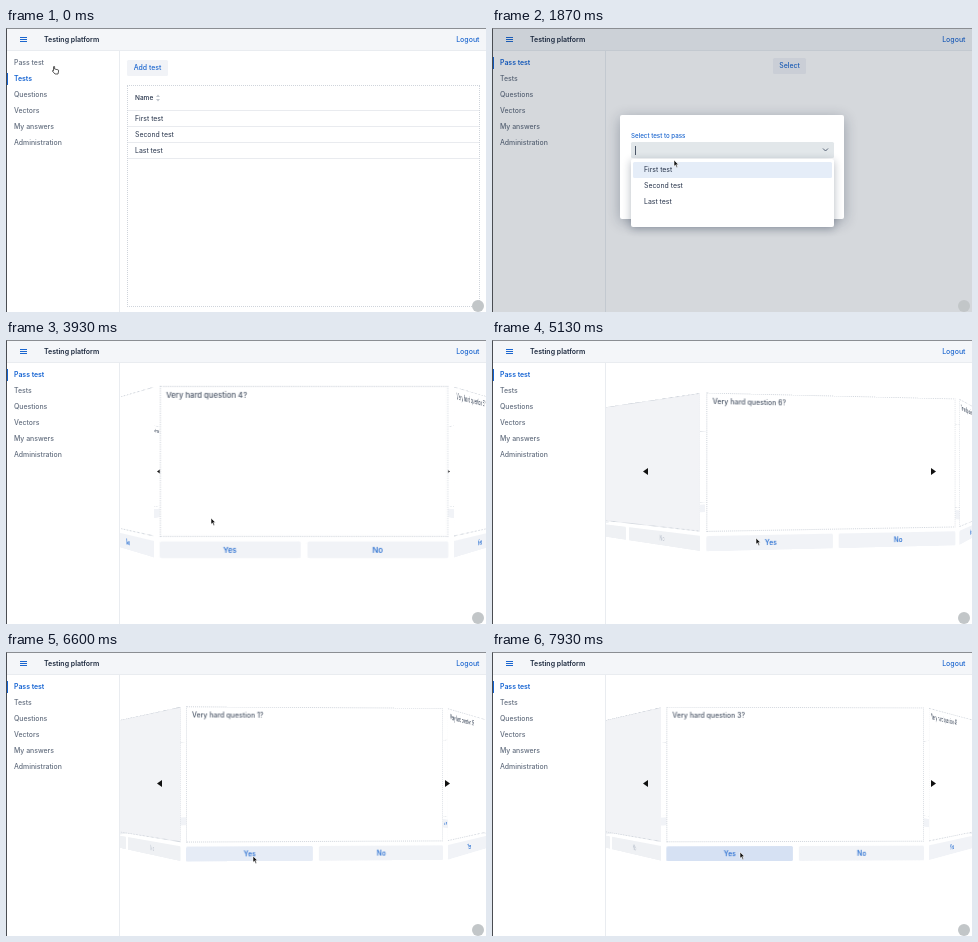
Write an HTML page that moves like this. It is 480 px wide and 284 px high and loops after 8000 ms.

```html
<!DOCTYPE html>
<html lang="en">
<head>
<meta charset="utf-8">
<title>Testing platform</title>
<style>
  html, body { margin: 0; width: 100%; height: 100%; overflow: hidden; background: #fff; }
  body { position: relative; font: 6.9px/16px Inter, sans-serif; color: #26334a; }
  div, svg { position: absolute; box-sizing: border-box; white-space: nowrap; }
  #app { width: 480px; height: 284px; overflow: hidden; background: #fff; }
  #header { width: 480px; height: 23px; background: #f4f6f9; border-bottom: 1px solid #e9ecf0; }
  #title { left: 38px; top: 4px; font-size: 7px; font-weight: 600; color: #1c293e; }
  #logout { right: 6.5px; top: 4px; font-size: 7px; font-weight: 500; color: #1b66cf; }
  .bar { left: 14px; width: 7px; height: 1px; background: #1b66cf; }
  #side { top: 23px; width: 114px; height: 261px; border-right: 1px solid #e9ecf0; }
  .link { left: 8px; font-weight: 500; color: #626d7e; }
  .link.active { font-weight: 600; color: #1463d2; }
  .link.active::before { content: ''; position: absolute; left: -8px; top: 2px; width: 2px; height: 12px; background: #1463d2; }
  .button { background: #f1f3f7; color: #1b66cf; font-weight: 500; text-align: center; border-radius: 1.5px; }
  .button.hover { background: #e6ecf6; }
  .button.pressed { background: #d6e1f3; }
  #main { left: 114px; top: 23px; width: 366px; height: 261px; overflow: hidden; }
  .page { inset: 0; }
  #table { left: 7px; top: 34px; width: 353px; height: 222px; border: 1px dotted #cfd4db; }
  .row { left: 0; width: 351px; height: 16px; padding-left: 7px; border-bottom: 1px solid #e9ebef; }
  .row.head { height: 25px; line-height: 25px; font-size: 6.5px; font-weight: 500; }
  #stage { perspective: 550px; perspective-origin: 183.7px 108.75px; transform-style: preserve-3d; }
  #carousel { left: 183.7px; top: 108.75px; width: 0; height: 0; transform-style: preserve-3d; }
  .panel { left: -129px; top: -76.75px; width: 258px; height: 153.5px; }
  .card { width: 258px; height: 134.5px; padding: 0 5px; background: #fff; border: 1px dotted #d0d5dc; color: #4b5667; font-weight: 500; }
  .panel .button { top: 138.5px; width: 126px; height: 15px; line-height: 15px; }
  .done .card { background: #f2f3f6; color: #f2f3f6; }
  .done .button { background: #eff1f4; color: #bac2cd; }
  .arrow { top: 105px; width: 5px; height: 7px; background: #111; }
  #shade { inset: 0; background: rgba(24, 39, 64, .18); }
  #dialog { left: 128px; top: 87px; width: 224px; height: 104px; background: #fff; border-radius: 2px;
    box-shadow: 0 3px 14px rgba(20, 35, 60, .32); }
  #label { left: 11px; top: 13px; font-size: 6.2px; font-weight: 500; }
  .field { left: 11px; width: 203px; background: #e2e7ea; border-radius: 1.5px; }
  #choice { top: 27px; height: 16px; padding-left: 4.5px; font-weight: 500; }
  #caret { left: 4px; top: 4px; width: 1px; height: 9px; background: #4b5667; }
  #start { left: 11px; top: 76px; width: 203px; height: 16px; }
  #start.hover { background: #d6e1f1; }
  #list { left: 139px; top: 131px; width: 203px; height: 68px; background: #fff; border-radius: 2px;
    box-shadow: 0 2px 8px rgba(20, 35, 60, .32); }
  .item { left: 2px; width: 199px; height: 16px; padding-left: 11px; border-radius: 1.5px; }
  .item.hover { background: #e5edf8; }
  #badge { left: 466px; top: 272px; width: 12px; height: 12px; border-radius: 50%; background: #c2c6c8; }
  #edge { inset: 0; border-left: 1px solid #4a4d52; border-top: 1px solid #8b8e93; }
</style>
</head>
<body>
<div id="app">
  <div id="header">
    <div class="bar" style="top:9px"></div><div class="bar" style="top:11px"></div><div class="bar" style="top:13px"></div>
    <div id="title">Testing platform</div>
    <div id="logout">Logout</div>
  </div>
  <div id="side"></div>
  <div id="main">
    <div class="page" id="tests">
      <div class="button" style="left:7px;top:9px;width:41px;height:16px">Add test</div>
      <div id="table">
        <div class="row head">Name</div>
        <svg style="left:27px;top:8px" width="6" height="8" fill="#c0c6ce"><path d="M1 3l2-2.5L5 3zM1 5l2 2.5L5 5z"/></svg>
      </div>
    </div>
    <div class="page" id="select">
      <div class="button" style="left:167px;top:7px;width:33px;height:16px">Select</div>
    </div>
    <div class="page" id="stage">
      <div class="arrow" style="left:37px;clip-path:polygon(100% 0,100% 100%,0 50%)"></div>
      <div class="arrow" style="left:325px;clip-path:polygon(0 0,100% 50%,0 100%)"></div>
      <div id="carousel"></div>
    </div>
  </div>
  <div id="shade"></div>
  <div id="dialog">
    <div id="label">Select test to pass</div>
    <div class="field" id="choice"><span id="value"></span><div id="caret"></div>
      <svg style="right:5px;top:5px" width="7" height="6" fill="none" stroke="#566275"><path d="M1 1.5L3.5 4 6 1.5"/></svg>
    </div>
    <div class="field" style="top:46px;height:26px"></div>
    <div class="button" id="start">Start</div>
  </div>
  <div id="list"></div>
  <div id="badge"></div>
  <div id="edge"></div>
  <svg id="cursor" width="10" height="12" style="left:-1px;top:-1px;overflow:visible">
    <path id="pointer" d="M0 0V6.3L1.5 5 2.6 7.4 3.7 6.9 2.6 4.6H4.5Z" fill="#111" stroke="#fff" stroke-width=".6"/>
    <path id="hand" d="M-.5.7Q0-.3.6.6V3L4 3.8Q4.8 4 4.6 5L4 8H1L-1.7 5Q-1.6 4-.5 4.8Z" fill="#fff" stroke="#333" stroke-width=".8"/>
  </svg>
</div>
<script>
const LOOP = 8000, COUNT = 7, RADIUS = 275, TURN = 600;
const OPEN_PAGE = 270, OPEN_DIALOG = 400, OPEN_LIST = 1530, PICK = 2600, CLOSE_DIALOG = 3520, BEGIN = 3640;
const answers = [4280, 4825, 5170, 6165, 6830, 7450, 8010];
const tests = ['First test', 'Second test', 'Last test'];
// time, x, y of the pointer tip
const path = [
  [0, 48, 38], [70, 48, 38], [130, 37, 34], [970, 37, 34], [1200, 184, 113], [1560, 184, 113],
  [1850, 182, 132], [2330, 182, 138], [2640, 182, 140], [3200, 205, 178], [3960, 205, 178],
  [4240, 264, 198], [5840, 264, 198], [6130, 247, 204], [6700, 247, 204], [6900, 248, 200], [8000, 248, 200]
];

const el = id => document.getElementById(id);
const clamp = v => Math.min(1, Math.max(0, v));
const add = (parent, className, text = '', style = {}) => {
  const node = document.createElement('div');
  node.className = className;
  node.textContent = text;
  Object.assign(node.style, style);
  return parent.appendChild(node);
};
const show = (id, on) => { el(id).style.display = on ? '' : 'none'; };

// The standard CSS "ease" curve
function ease(x) {
  x = clamp(x);
  if (x === 0 || x === 1) return x;
  let low = 0, high = 1, u;
  for (let i = 0; i < 20; i++) {
    u = (low + high) / 2;
    if (.75 * u * (1 - u) + u ** 3 < x) low = u; else high = u;
  }
  return .3 * u * (1 - u) ** 2 + 3 * u * u * (1 - u) + u ** 3;
}

const links = ['Pass test', 'Tests', 'Questions', 'Vectors', 'My answers', 'Administration']
  .map((name, i) => add(el('side'), 'link', name, { top: 4 + 16 * i + 'px' }));
tests.forEach((name, i) => add(el('table'), 'row', name, { top: 25 + 16 * i + 'px' }));
const items = tests.map((name, i) => add(el('list'), 'item', name, { top: 3 + 16 * i + 'px' }));
const panels = Array.from({ length: COUNT }, (_, i) => {
  const node = add(el('carousel'), 'panel', '', {
    transform: `rotateY(${i * 360 / COUNT}deg) translateZ(${RADIUS}px)`
  });
  add(node, 'card', `Very hard question ${(i + 3) % COUNT + 1}?`);
  const yes = add(node, 'button', 'Yes', { left: 0 });
  add(node, 'button', 'No', { right: 0 });
  return { node, yes };
});

function pointerAt(t) {
  const i = path.findIndex(p => p[0] > t);
  const [t0, x0, y0] = path[i - 1], [t1, x1, y1] = path[i];
  const k = (t - t0) / (t1 - t0), s = k * k * (3 - 2 * k);
  return [x0 + (x1 - x0) * s, y0 + (y1 - y0) * s];
}

function drawPages(t) {
  const passing = t >= OPEN_PAGE;
  links[0].classList.toggle('active', passing);
  links[1].classList.toggle('active', !passing);
  show('tests', !passing);
  show('select', passing && t < BEGIN);
  show('stage', t >= BEGIN);
}

function drawDialog(t, y) {
  const visible = clamp((t - OPEN_DIALOG) / 200) * clamp((BEGIN - t) / (BEGIN - CLOSE_DIALOG));
  const open = t >= OPEN_LIST && t < PICK;
  for (const id of ['shade', 'dialog']) {
    show(id, visible > 0);
    el(id).style.opacity = visible;
  }
  el('dialog').style.transform = `scale(${.95 + .05 * visible})`;
  el('label').style.color = open ? '#1b66cf' : '#4c5d82';
  el('value').textContent = t >= PICK ? tests[0] : '';
  show('caret', open);
  show('list', open);
  el('list').style.opacity = clamp((t - OPEN_LIST) / 120);
  items[0].classList.toggle('hover', y > 131);
  el('start').classList.toggle('hover', y > 163);
}

function drawCarousel(t) {
  const turned = answers.reduce((sum, at) => sum + ease((t - at) / TURN), 0);
  const zoom = RADIUS * (1 - ease((t - BEGIN) / TURN));
  el('carousel').style.transform =
    `translateZ(${zoom - RADIUS}px) rotateY(${-turned * 360 / COUNT}deg)`;
  panels.forEach(({ node, yes }, i) => {
    const front = Math.abs(turned - i) < .15 && t > 4200 && t < answers[i];
    // An answered panel is fresh again once it has turned to the back
    node.classList.toggle('done', t >= answers[i] && turned < i + 2);
    yes.classList.toggle('hover', front);
    yes.classList.toggle('pressed', front && t > answers[i] - 100);
  });
}

function frame(now) {
  const t = now % LOOP, [x, y] = pointerAt(t);
  drawPages(t);
  drawDialog(t, y);
  drawCarousel(t);
  el('cursor').style.transform = `translate(${x + 1}px, ${y + 1}px)`;
  show('hand', t < 1000);
  show('pointer', t >= 1000);
  requestAnimationFrame(frame);
}
requestAnimationFrame(frame);
</script>
</body>
</html>
```
